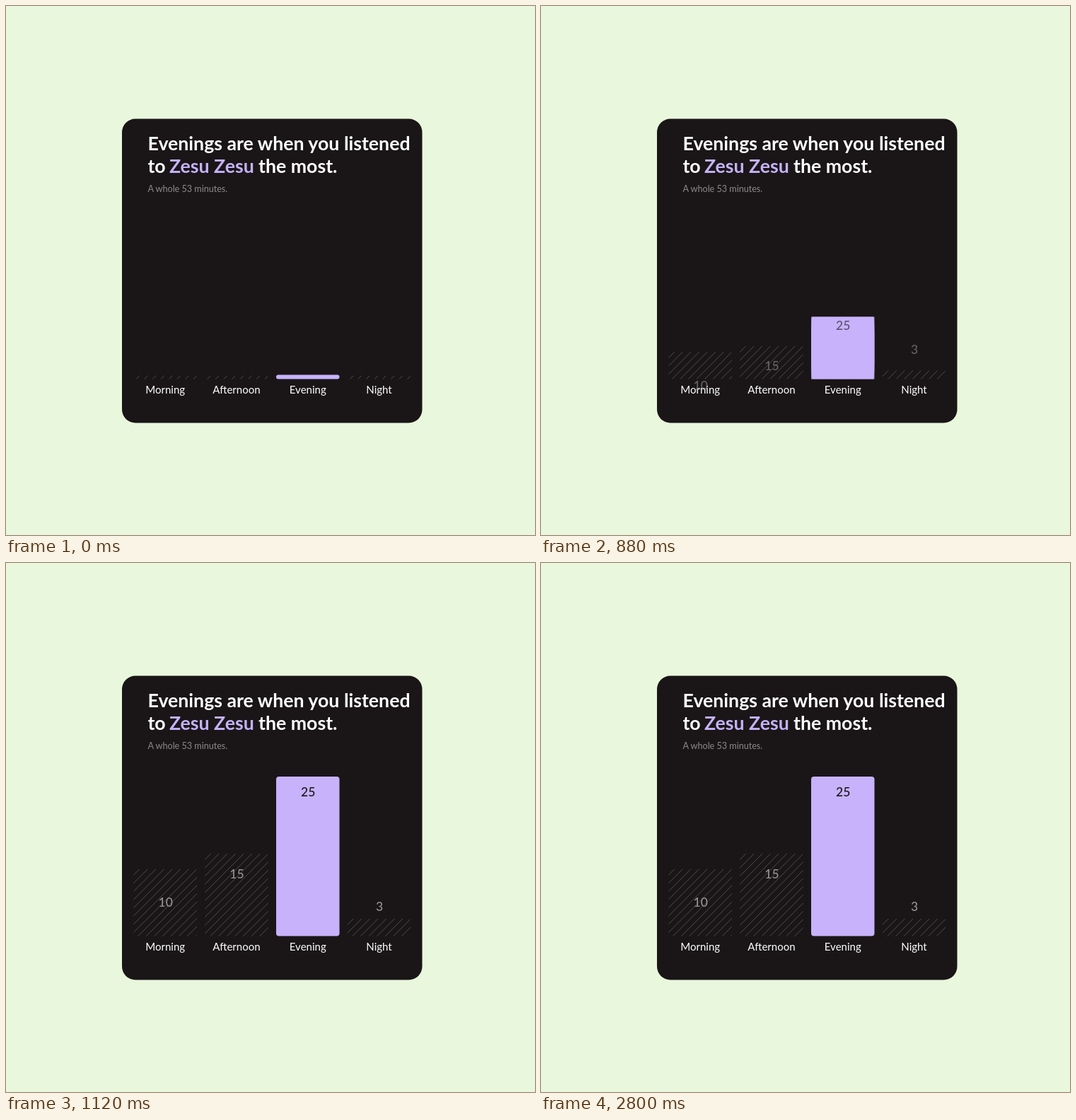
Recreate the animation shown at these times as an HTML page. Size 748 by 748 pixels, loop 2.88 s.

```html
<!DOCTYPE html>
<html lang="en">
<head>
<meta charset="utf-8">
<title>Listening by time of day</title>
<style>
  html, body { margin: 0; width: 100%; height: 100%; overflow: hidden; background: #e9f7dc; }
  svg { display: block; width: 100%; height: 100%; font-family: Lato, "Open Sans", sans-serif; }
  .title { font-size: 26.7px; font-weight: 700; fill: #fff; }
  .accent { fill: #c5b2fa; }
  .note { font-size: 12.6px; fill: #8d8a8b; }
  .label { font-size: 15px; fill: #fff; text-anchor: middle; }
  .count { font-size: 17.5px; font-weight: 500; text-anchor: middle; }
  .hatch { fill: none; stroke: #504c4d; stroke-width: 1; }
</style>
</head>
<body>
<svg id="stage" viewBox="0 0 748 748">
  <rect width="748" height="748" fill="#e9f7dc"/>
  <rect x="164" y="159.5" width="424.5" height="430" rx="19" fill="#1a1617"/>
  <text class="title" x="200.5" y="204">Evenings are when you listened</text>
  <text class="title" y="236"><tspan x="200.5">to</tspan> <tspan class="accent" x="231">Zesu Zesu</tspan> <tspan x="357">the most.</tspan></text>
  <text class="note" x="200.5" y="262.5">A whole 53 minutes.</text>
</svg>
<script>
const LOOP = 2880, STEP = 80, START = 806, GROW = 300;
const BASE = 527.5, WIDTH = 89.5, PITCH = 11.6;
const stage = document.getElementById('stage');

// low/high: bar heights; from/to: centre of the number
const bars = [
  { name: 'Morning', value: 10, x: 180.5, low: 5, high: 95, from: 570, to: 479.7 },
  { name: 'Afternoon', value: 15, x: 281.2, low: 5, high: 116.5, from: 550, to: 439.3 },
  { name: 'Evening', value: 25, x: 382, low: 6, high: 225.5, from: 528, to: 323.5, solid: true },
  { name: 'Night', value: 3, x: 482.8, low: 5, high: 24.5, from: 485.5, to: 485.5 }
];

function add(tag, attrs, parent = stage, text = '') {
  const node = document.createElementNS('http://www.w3.org/2000/svg', tag);
  set(node, attrs);
  node.textContent = text;
  return parent.appendChild(node);
}

function set(node, attrs) {
  for (const key in attrs) node.setAttribute(key, attrs[key]);
}

// Diagonals hanging down from the top edge of a bar
function hatchPath(left, top) {
  let d = '';
  for (let k = 0; k < 19; k++) d += `M${left + 8.5 + k * PITCH} ${top}l-120 120`;
  return d;
}

bars.forEach((bar, i) => {
  const box = { x: bar.x, width: WIDTH };
  const mid = bar.x + WIDTH / 2;
  if (bar.solid) {
    bar.under = add('rect', { ...box, fill: '#9b8fb4' });
    bar.rect = add('rect', { ...box, fill: '#c7b2fb' });
  } else {
    bar.rect = add('rect', { ...box, rx: 3 }, add('clipPath', { id: 'clip' + i }));
    bar.hatch = add('path', { class: 'hatch', 'clip-path': `url(#clip${i})` });
  }
  add('text', { class: 'label', x: mid, y: 548 }, stage, bar.name);
  bar.count = add('text', { class: 'count', x: mid + .5, fill: bar.solid ? '#1a1516' : '#959293' }, stage, bar.value);
});

const lerp = (a, b, p) => a + (b - a) * p;

// cubic-bezier(0, 0, .58, 1)
function easeOut(u) {
  if (u <= 0) return 0;
  if (u >= 1) return 1;
  let lo = 0, hi = 1;
  for (let i = 0; i < 24; i++) {
    const s = (lo + hi) / 2;
    if (1.74 * (1 - s) * s * s + s ** 3 < u) lo = s; else hi = s;
  }
  return 3 * (1 - lo) * lo * lo + lo ** 3;
}

function draw(time) {
  const t = Math.floor(time % LOOP / STEP) * STEP;
  const p = easeOut((t - START) / GROW);
  const moving = p > 0 && p < 1;
  for (const bar of bars) {
    const height = lerp(bar.low, bar.high, p);
    const top = BASE - height;
    set(bar.rect, { y: top, height });
    set(bar.count, { y: lerp(bar.from, bar.to, p) + 6.3, opacity: Math.sqrt(p) });
    if (bar.solid) {
      // While it grows, the rounded corners are stretched along the sides
      const rx = moving ? 1.5 : lerp(3, 4, p);
      set(bar.rect, { rx, ry: moving ? height / 3 : rx });
      set(bar.under, { y: top, height, opacity: moving ? 1 : 0 });
    } else {
      set(bar.hatch, { d: hatchPath(bar.x, top) });
    }
  }
}

function tick() {
  draw(performance.now());
  requestAnimationFrame(tick);
}
tick();
</script>
</body>
</html>
```
